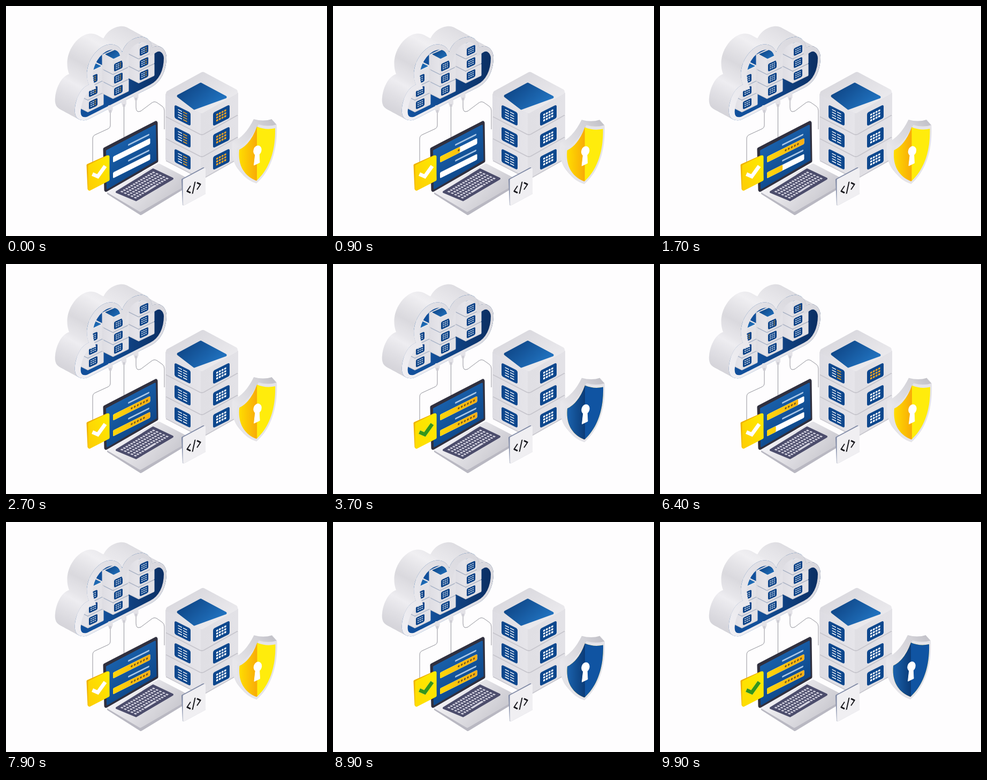
Recreate the animation shown at these times as an HTML page. Size 600x429 px, loop 10000 ms.

```html
<!DOCTYPE html>
<html lang="en">
<head>
<meta charset="utf-8">
<title>Cloud server security</title>
<style>
  html, body { margin: 0; width: 100%; height: 100%; overflow: hidden; background: #fefdfe; }
  svg { display: block; width: 100vw; height: 100vh; }
</style>
</head>
<body>
<svg id="stage" viewBox="0 0 600 429">
  <defs>
    <linearGradient id="cloudSide" gradientUnits="userSpaceOnUse" x1="128" y1="210" x2="275" y2="70">
      <stop offset="0" stop-color="#d3d2d8"/><stop offset=".25" stop-color="#eeedf1"/>
      <stop offset=".42" stop-color="#dad9de"/><stop offset=".65" stop-color="#f0eff2"/>
      <stop offset="1" stop-color="#dddce1"/>
    </linearGradient>
    <linearGradient id="rim" x1="0" y1="1" x2="1" y2="0">
      <stop offset="0" stop-color="#f1f0f4"/><stop offset="1" stop-color="#d6d5db"/>
    </linearGradient>
    <linearGradient id="faceL"><stop offset="0" stop-color="#dedde3"/><stop offset="1" stop-color="#e6e5ea"/></linearGradient>
    <linearGradient id="faceR"><stop offset="0" stop-color="#e0dfe4"/><stop offset="1" stop-color="#e3e2e7"/></linearGradient>
    <linearGradient id="lid" x1="0" y1="0" x2="1" y2="1">
      <stop offset="0" stop-color="#d5d4da"/><stop offset="1" stop-color="#f0eff2"/>
    </linearGradient>
    <linearGradient id="navy"><stop offset=".3" stop-color="#12509b"/><stop offset="1" stop-color="#0b2d60"/></linearGradient>
    <linearGradient id="pool" x1="0" y1="0" x2="1" y2=".6">
      <stop offset="0" stop-color="#0c3f7e"/><stop offset="1" stop-color="#2173c0"/>
    </linearGradient>
    <linearGradient id="screen" x1="0" y1="0" x2=".6" y2="1">
      <stop offset="0" stop-color="#1f6cba"/><stop offset="1" stop-color="#0b4283"/>
    </linearGradient>
    <linearGradient id="deck" x1="0" y1="0" x2="1" y2=".5">
      <stop offset=".2" stop-color="#f4f3f6"/><stop offset="1" stop-color="#c6c5cc"/>
    </linearGradient>
    <linearGradient id="gold" x1="1" y1="0" x2="0" y2="1">
      <stop offset="0" stop-color="#ffea00"/><stop offset="1" stop-color="#fdce04"/>
    </linearGradient>
    <linearGradient id="barFill" gradientUnits="userSpaceOnUse" x1="0" y1="0" x2="69" y2="0">
      <stop offset="0" stop-color="#ffd60a"/><stop offset="1" stop-color="#f8ae14"/>
    </linearGradient>
    <linearGradient id="goldL"><stop offset="0" stop-color="#ffe100"/><stop offset="1" stop-color="#f8a908"/></linearGradient>
    <linearGradient id="blueL"><stop offset="0" stop-color="#1c66b2"/><stop offset="1" stop-color="#0a3a76"/></linearGradient>
    <linearGradient id="shieldSide"><stop offset="0" stop-color="#e8e7eb"/><stop offset="1" stop-color="#c3c2c9"/></linearGradient>
    <path id="cloud" d="M148 213C133 215 127 205 129 190C131 172 140 152 155 147C144 118 160 88 180 76C196 67 212 72 217 86C222 70 235 60 250 58C264 56 272 66 273 78C285 70 299 78 300 95C300 120 290 142 270 152L152 212Z"/>
    <path id="guard" d="M472 221Q490 226 506 221C508 262 498 305 468 331C440 322 428 298 432 264Q456 254 472 221Z"/>
    <path id="crest" d="M469 225Q486 232 503 228C504 264 495 302 468 326C445 317 433 297 436 268Q457 258 469 225Z"/>
    <clipPath id="inCloud"><use href="#cloud"/></clipPath>
    <clipPath id="inCrest"><use href="#crest"/></clipPath>
  </defs>
</svg>
<script>
const NS = 'http://www.w3.org/2000/svg';
const stage = document.getElementById('stage');

function add(parent, tag, attrs) {
  const el = document.createElementNS(NS, tag);
  for (const k in attrs) el.setAttribute(k, attrs[k]);
  parent.append(el);
  return el;
}
const group = (parent, attrs = {}) => add(parent, 'g', attrs);
const line = (parent, d, stroke, width, more = {}) =>
  add(parent, 'path', { d, fill: 'none', stroke, 'stroke-width': width, 'stroke-linejoin': 'round', ...more });
// Polygon whose corners are softened by a round stroke of its own paint.
const poly = (parent, points, fill, round = 0) =>
  add(parent, 'polygon', { points, fill, stroke: round ? fill : 'none', 'stroke-width': round, 'stroke-linejoin': 'round' });
const skewed = (parent, x, y, slope) => group(parent, { transform: `matrix(1 ${slope} 0 1 ${x} ${y})` });
const box = (parent, x, y, width, height, fill, rx = 0) =>
  add(parent, 'rect', { x, y, width, height, fill, rx });

// Blinking lamps, grouped by server tier from top to bottom
const lamps = [[], [], []];

// Wires under the cloud
line(stage, 'M195 198V223Q195 227 191 229L167 240Q162 242 162 248V294', '#92929a', 1);
line(stage, 'M220.500 186V248', '#92929a', 1);
line(stage, 'M243 174V189Q243 200 252 196L272 181Q277 177 282 180L292 187Q296 190 296 195V230', '#92929a', 1);

// Cloud body
const cloud = group(stage);
for (let i = 38; i > 0; i--) {
  add(cloud, 'use', { href: '#cloud', fill: 'url(#cloudSide)', transform: `translate(${-i * 37 / 38} ${-i * 20 / 38})` });
}
add(cloud, 'use', { href: '#cloud', fill: 'url(#navy)' });
const inside = group(cloud, { 'clip-path': 'url(#inCloud)' });

function smallTower(x, y) {
  const g = group(inside, { transform: `translate(${x} ${y})` });
  for (let i = 2; i >= 0; i--) {
    const tier = group(g, { transform: `translate(0 ${i * 22.7})` });
    const top = i ? 0 : -5;
    poly(tier, `-30,${top - 16} -10,${top - 6} -10,15 -30,5`, 'url(#faceL)', 1);
    poly(tier, `-10,${top - 6} 19,${top - 20} 19,1 -10,15`, 'url(#faceR)', 1);
    line(tier, 'M-30 5.500L-10 15.500L19 1.500', '#c8c7ce', 1);
    const panel = skewed(tier, 0, 0, -0.45);
    box(panel, -8, -7.5, 16, 14.5, '#0e4488', 2.5);
    for (let r = 0; r < 3; r++) for (let c = 0; c < 3; c++) {
      const dot = box(panel, -5 + c * 3.7, -4.5 + r * 3.5, 2.5, 1.3, '#fff');
      if (c === 2) lamps[i].push(dot);
    }
  }
  poly(g, '-30,-21 -10,-11 19,-25 -1,-35', 'url(#lid)', 1);
  poly(g, '-24,-22 -9,-14 14,-25 -1,-32', 'url(#pool)', 1);
}
smallTower(258, 83);
smallTower(163, 137);
smallTower(210, 112);
add(inside, 'use', { href: '#cloud', fill: 'none', stroke: 'url(#rim)', 'stroke-width': 16, transform: 'translate(3 2)' });

for (const [x, y] of [[195, 188], [220.5, 177], [243, 165]]) {
  box(stage, x - 4.5, y - 3, 9, 11, '#e3e2e7', 3);
  box(stage, x - 2.5, y + 6, 5, 5, '#cfced5', 1.5);
}

// Large server
const server = group(stage);
for (let i = 2; i >= 0; i--) {
  const tier = group(server, { transform: `translate(0 ${i * 41})` });
  poly(tier, '300,165 366,200 366,238 300,204', 'url(#faceL)', 4);
  poly(tier, '366,200 432,163 432,201 366,238', 'url(#faceR)', 4);
  line(tier, 'M299 206.500L362 239Q366 241 370 239L433 203.500', '#c6c5cc', 1.8);

  const left = skewed(tier, 330, 204, 0.5);
  box(left, -15, -12.5, 30, 25, '#0d478d', 3.5);
  for (let r = 0; r < 4; r++) {
    box(left, -8.5, -7.5 + r * 4.7, 7.5, 1.6, '#fff');
    lamps[i].push(box(left, 1, -7.5 + r * 4.7, 7.5, 1.6, '#fff'));
  }
  const right = skewed(tier, 402.5, 204, -0.5);
  box(right, -15.5, -12.5, 31, 25, '#0d478d', 3.5);
  for (let r = 0; r < 3; r++) for (let c = 0; c < 4; c++) {
    lamps[i].push(box(right, -9.5 + c * 5, -7 + r * 5.3, 3.5, 3.3, '#fff'));
  }
}
poly(server, '304,163 368,128 428,160 366,195', 'url(#lid)', 10);
poly(server, '322,168 364,145.500 410,170 352,191', 'url(#pool)', 5);

// Laptop
const laptop = group(stage);
poly(laptop, '192,349 286,300 344,331 252,387', '#b9b8c2', 6);
poly(laptop, '192,346 286,297 344,327 251,381', 'url(#deck)', 6);
poly(laptop, '207,347 275,305 311,322 243,362', '#4c4d6c', 4);
const keys = group(laptop, { transform: 'matrix(71 -43 38 17 205 347)' });
for (let r = 0; r < 5; r++) for (let c = 0; c < 14; c++) {
  if (r === 4 && c > 3 && c < 9) continue;
  box(keys, 0.06 + c * 0.064, 0.11 + r * 0.165, 0.04, 0.1, '#d3d2df');
}
box(keys, 0.316, 0.77, 0.3, 0.1, '#d3d2df');
poly(laptop, '185,267 280,218 281,289 187,343', '#30303f', 7);
poly(laptop, '188.500,270 278.500,223 280,287 189.500,340', 'url(#screen)', 3);

// Password fields
function field(x, y, start) {
  const g = skewed(laptop, x, y, -0.5);
  box(g, 28, -14.5, 40, 3, '#a9c6e6', 1.5);
  box(g, 0, -5.5, 69.5, 11, '#fff', 2);
  const fill = box(g, 0, -5.5, 0, 11, 'url(#barFill)', 2);
  const stars = [];
  for (let i = 0; i < 6; i++) {
    const sx = 35 + i * 5.7;
    stars.push(line(g, `M${sx - 1.9} 0h3.800M${sx} -2v4M${sx - 1.3} -1.300l2.600 2.600M${sx - 1.3} 1.300l2.600 -2.600`, '#604a20', 0.8));
  }
  return { fill, stars, start };
}
const fields = [field(200, 286.5, 0), field(200, 316, 1000)];

// Code tile
poly(stage, '330,324 369,303 371,349 332,370', '#7f89a5', 4);
poly(stage, '332.500,324.500 371,304 371,349.500 332.500,370', '#f0eff2', 4);
line(skewed(stage, 351, 339, -0.5), 'M-6 -6.500L-12.500 0L-6 6.500M2.500 -10L-2.500 10M6 -6.500L12.500 0L6 6.500', '#17171c', 2.2);

// Check tile
poly(stage, '153,297 189,281 191,323 155,341', '#eeb200', 5);
poly(stage, '156,298.500 191,281 191,324 156,342', 'url(#gold)', 5);
const tileGlow = poly(stage, '156,298.500 191,281 191,324 156,342', '#ffec00', 5);
const checkPath = 'M161.500 313.500L171.500 318L185.500 298.500';
line(stage, checkPath, '#fff', 7, { 'stroke-linejoin': 'miter' });
const greenCheck = line(stage, checkPath, '#35961a', 7, { 'stroke-linejoin': 'miter' });

// Shield
const shield = group(stage);
for (let i = 10; i > 0; i--) {
  add(shield, 'use', { href: '#guard', fill: 'url(#shieldSide)', transform: `translate(${-i * 0.9} ${-i})` });
}
add(shield, 'use', { href: '#guard', fill: '#e5e4e9' });
function crest(leftPaint, rightPaint) {
  const g = group(shield, { 'clip-path': 'url(#inCrest)' });
  box(g, 433, 220, 37, 110, leftPaint);
  box(g, 469, 220, 36, 110, rightPaint);
  return g;
}
crest('url(#goldL)', '#ffec0c');
const blueCrest = crest('url(#blueL)', '#1054a2');
add(shield, 'ellipse', { cx: 470, cy: 269.5, rx: 7.5, ry: 9.5, fill: '#fff', transform: 'rotate(20 470 269.5)' });
poly(shield, '466,275 473,272 474,292 463.500,297', '#fff', 1);

const CYCLE = 5000;
const FILL_TIME = 1670;
const clamp = v => Math.max(0, Math.min(1, v));

function render(time) {
  const t = Math.floor(time / 100) * 100 % CYCLE;
  const beat = t % 1000;

  for (const { fill, stars, start } of fields) {
    fill.setAttribute('width', 69.5 * clamp((t - start) / FILL_TIME));
    stars.forEach((s, i) => s.setAttribute('opacity', t >= start + 800 + i * 200 ? 1 : 0));
  }
  // Every second all lamps light up, then go out tier by tier from the bottom.
  lamps.forEach((tier, i) => {
    const colour = beat < 600 - i * 200 ? '#f6a521' : '#fff';
    for (const lamp of tier) lamp.setAttribute('fill', colour);
  });

  const secure = clamp((t - 2900) / 200);
  for (const el of [blueCrest, greenCheck]) el.setAttribute('opacity', secure);
  tileGlow.setAttribute('opacity', secure * 0.5);

  const sway = (1 - Math.cos(t / 2500 * 2 * Math.PI)) / 2;
  shield.setAttribute('transform', `translate(${sway * 2} ${sway * 1.5})`);
}

const begin = performance.now();
function tick() {
  render(performance.now() - begin);
  requestAnimationFrame(tick);
}
tick();
</script>
</body>
</html>
```
